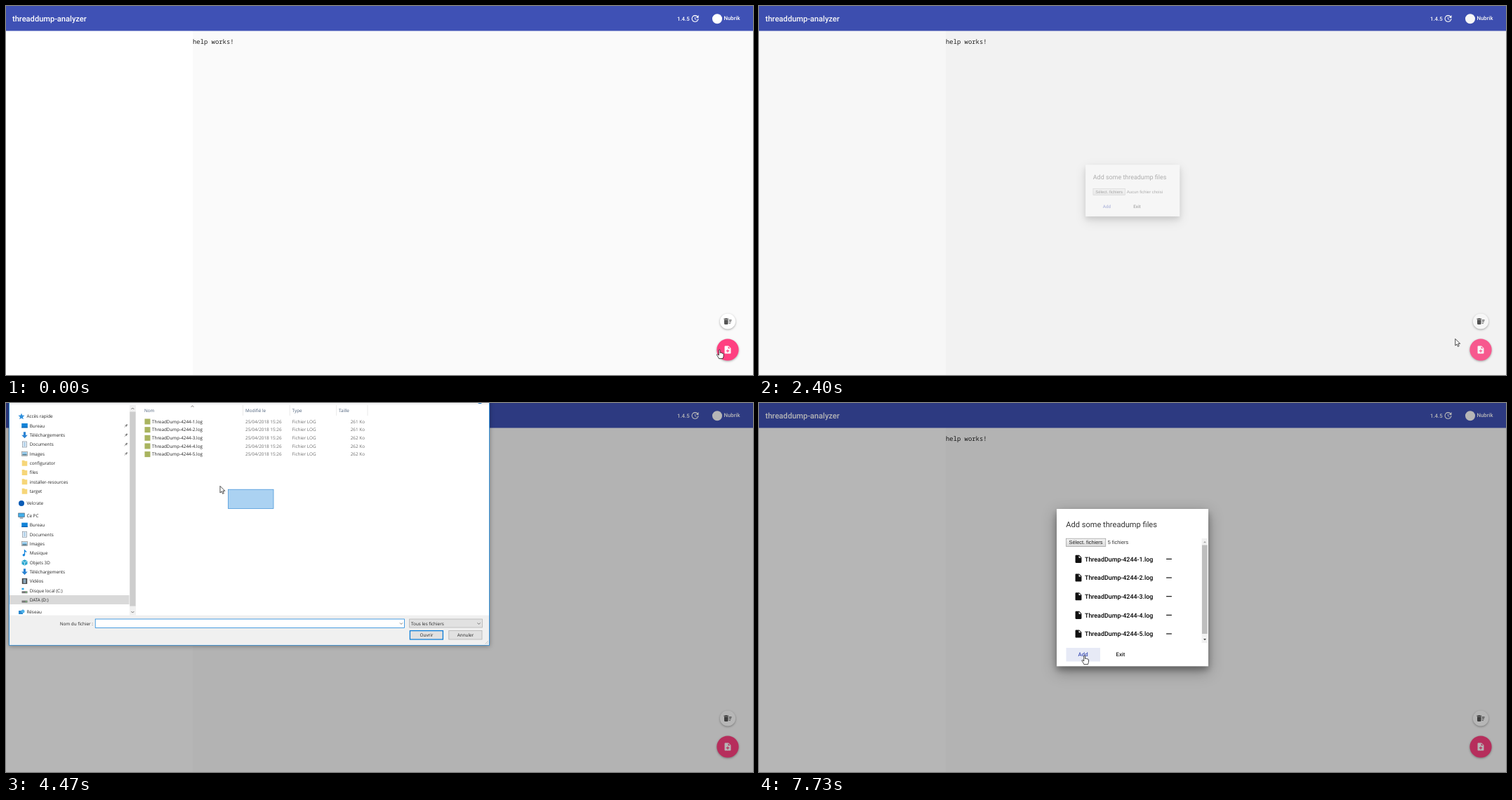
Animation, 1064 px wide and 526 px high, one loop 8000 ms. Source, as an HTML page:

```html
<!DOCTYPE html>
<html lang="fr">
<head>
<meta charset="utf-8">
<title>threaddump-analyzer</title>
<style>
html, body { margin: 0; width: 100%; height: 100%; overflow: hidden; background: #fafafa; }
svg { display: block; width: 100vw; height: 100vh; }
text { white-space: pre; text-rendering: geometricPrecision; }
.ui { font: 7.78px Roboto, sans-serif; }
.med { font-weight: 500; }
.head { font-size: 11.1px; }
.file { font-size: 8.89px; }
.mono { font: 8.89px "Noto Sans Mono", monospace; }
.btn { font: 7.4px "Liberation Sans", Arial, sans-serif; }
.win { font: 6.35px "Open Sans", sans-serif; }
.mid { text-anchor: middle; }
.end { text-anchor: end; }
.fab { filter: drop-shadow(0 1.5px 1.5px #0005); }
.card { filter: drop-shadow(0 5px 4px #0004) drop-shadow(0 6px 10px #0005); }
.window { filter: drop-shadow(0 1px 3px #0005); }
</style>
</head>
<body>
<svg id="stage" viewBox="0 0 1064 526" preserveAspectRatio="none"></svg>
<script>
const text = (x, y, s, cls, fill = '#222') =>
  `<text x="${x}" y="${y}" class="${cls}" fill="${fill}">${s}</text>`;
// Box given by its edges
const box = (l, t, r, b, fill, more = '') =>
  `<rect x="${l}" y="${t}" width="${r - l}" height="${b - t}" fill="${fill}" ${more}/>`;
const path = (d, fill, more = '') => `<path d="${d}" fill="${fill}" ${more}/>`;
const line = (d, color, w = 0.8) => path(d, 'none', `stroke="${color}" stroke-width="${w}"`);
const dot = (x, y, r, fill, more = '') => `<circle cx="${x}" cy="${y}" r="${r}" fill="${fill}" ${more}/>`;
const at = (x, y, s) => `<g transform="translate(${x} ${y})">${s}</g>`;
const edge = (color, w = 0.7) => `stroke="${color}" stroke-width="${w}"`;
const group = (id, s) => `<g id="${id}">${s}</g>`;

const glyphs = {
  update: 'M21 10.12h-6.78l2.74-2.82c-2.73-2.7-7.15-2.8-9.88-.1-2.73 2.71-2.73 7.08 0 9.79s7.15 2.71 9.88 0C18.32 15.65 19 14.08 19 12.1h2c0 1.98-.88 4.55-2.64 6.29-3.51 3.48-9.21 3.48-12.72 0-3.5-3.47-3.53-9.11-.02-12.58s9.14-3.47 12.65 0L21 3v7.12zM12.5 8v4.25l3.5 2.08-.72 1.21L11 13V8h1.5z',
  sweep: 'M15 16h4v2h-4zm0-8h7v2h-7zm0 4h6v2h-6zM3 18c0 1.1.9 2 2 2h6c1.1 0 2-.9 2-2V8H3v10zM14 5h-3l-1-1H6L5 5H2v2h12z',
  add: 'M14 2H6c-1.1 0-2 .9-2 2v16c0 1.1.9 2 2 2H18c1.1 0 2-.9 2-2V8l-6-6zm2 14h-3v3h-2v-3H8v-2h3v-3h2v3h3v2zm-3-7V3.5L18.5 9H13z',
  file: 'M6 2c-1.1 0-2 .9-2 2v16c0 1.1.9 2 2 2H18c1.1 0 2-.9 2-2V8l-6-6H6zm7 7V3.5L18.5 9H13z',
  minus: 'M19 13H5v-2h14v2z'
};
const glyph = (name, x, y, fill) =>
  path(glyphs[name], fill, `transform="translate(${x} ${y}) scale(.556) translate(-12 -12)"`);

const names = [1, 2, 3, 4, 5].map(n => `ThreadDump-4244-${n}.log`);

const page =
  box(0, 0, 1064, 526, '#fafafa') + box(0, 35, 266, 526, '#fff') + box(0, 0, 1064, 35.5, '#3f51b5') +
  text(9, 21.6, 'threaddump-analyzer', 'ui med head', '#fff') +
  text(956, 20.6, '1.4.5', 'ui med', '#fff') + glyph('update', 981.5, 18, '#fff') +
  dot(1013, 18.2, 7, '#fff') + text(1022.5, 20.3, 'Nubrik', 'ui med', '#fff') +
  text(266, 53.6, 'help works!', 'mono') +
  dot(1028, 449.5, 11.1, '#fff', 'class="fab"') + glyph('sweep', 1028, 449.5, '#555') +
  dot(1028, 490, 15.6, '#ff4081', 'class="fab"') +
  '<clipPath id="round"><circle cx="1028" cy="490" r="15.6"/></clipPath>' +
  `<g clip-path="url(#round)">${dot(1022, 490, 0, '#fff', 'id="ripple"')}</g>` +
  glyph('add', 1028, 490, '#fff');

// Shared dialog parts, placed from the card's top left corner
const form = (x, y, w, h, status, rest) => at(x, y,
  box(0, 0, w, h, '#fff', 'class="card"') +
  text(13.2, 26, 'Add some threadump files', 'ui head', '#333') +
  box(13.4, 42.2, 69.8, 53.4, 'url(#grey)', `class="choose" ${edge('#999')}`) +
  text(41.5, 50.4, 'Sélect. fichiers', 'btn mid') + text(72.7, 50.4, status, 'btn', '#333') +
  rest +
  text(37.6, h - 14.3, 'Add', 'ui med mid', '#3f51b5') + text(91, h - 14.3, 'Exit', 'ui med mid'));

const emptyForm = form(449, 217.5, 166.5, 91.3, 'Aucun fichier choisi', '');
const fullForm = form(424, 151, 216, 224.3, '5 fichiers',
  box(136, 168.5, 184, 187.5, '#0000001f', 'id="minusHover"') +
  box(13.5, 198, 62, 217.5, '#3f51b51f', 'id="addHover"') +
  names.map((n, i) => {
    const y = 71.4 + i * 26.65;
    return glyph('file', 31, y, '#111') + text(40, y + 3.2, n, 'ui med file', '#000') +
      glyph('minus', 160, y, '#000');
  }).join('') +
  box(206.5, 42, 215.3, 191, '#f1f1f1') + box(207, 51.5, 214.6, 178, '#bebebe') +
  path('M209 48.2l2-2.2 2 2.2z', '#a3a3a3') + path('M209 185l2 2.2 2-2.2z', '#444'));

const blue = '#1979ca', drive = box(-4, 1, 4, 4, '#777') + box(1.5, 2, 3, 3, '#7f7');
const page9 = box(-3, -4, 3, 4, '#fff', edge('#789'));
const icons = {
  star: path('M0-4.5L1.2-1.4 4.5-1.2 2 1 2.8 4.2 0 2.4-2.8 4.2-2 1-4.5-1.2-1.2-1.4z', '#2d8fdd'),
  desk: box(-4.3, -3.3, 4.3, 3, '#1283d8') + box(-4.3, 2, 4.3, 3, '#0b5ca8'),
  down: path('M-1.6-4.3H1.6V0H4.3L0 4.5-4.3 0H-1.6z', '#2b83d3'),
  doc: page9 + line('M-1.7-2H1.7M-1.7 0H1.7M-1.7 2H1.7', '#4b95cf'),
  image: box(-4, -3, 4, 3, '#fff', edge('#888')) + box(-3.2, -2.2, 3.2, .5, '#8fc9ee') + box(-3.2, .5, 3.2, 2.2, '#47748b'),
  folder: path('M-3.8-4H-.5L.5-3H3.8V4H-3.8z', '#f6d679'),
  plain: dot(0, 0, 4, '#0a5bb5'),
  pc: box(-4.3, -3.6, 4.3, 2, '#43aee9', edge('#567')) + box(-2.4, 3, 2.4, 4, '#567'),
  note: dot(-1.2, 2.8, 1.7, '#1586dd') + line('M0 2.8V-4L2.6-1.5', '#1586dd', 1.3),
  cube: path('M0-4L4-2V2.4L0 4.4-4 2.4V-2z', '#2ea7cf') + line('M-4-2L0 0 4-2M0 0V4', '#d5f3fb'),
  film: box(-3.7, -4, 3.7, 4, '#444') + box(-2, -3, 2, 3, '#8aa7bb'),
  disk: box(-4, -3.5, -1, -1, '#28a8ea') + drive,
  drive,
  net: box(-4, -2, 2, 3, '#2c8ad0') + dot(2, -1, 2.5, '#4fb0e8')
};

const places = [
  [19, 'star Accès rapide', 'desk Bureau', 'down Téléchargements', 'doc Documents', 'image Images',
    'folder configurator', 'folder files', 'folder installer-resources', 'folder target'],
  [143, 'plain Velcrate'],
  [160.6, 'pc Ce PC', 'desk Bureau', 'doc Documents', 'image Images', 'note Musique', 'cube Objets 3D',
    'down Téléchargements', 'film Vidéos', 'disk Disque local (C:)', 'drive DATA (D:)'],
  [298, 'net Réseau']
];
const sidebar = places.map(([top, ...items], g) => items.map((item, i) => {
  const y = top + i * 13.33, cut = item.indexOf(' ');
  const pin = g == 0 && i > 0 && i < 5
    ? at(171, y, line('M-2.3 2.3L0 0M-1.5-1L1 1.5', '#777', .7) + path('M-.8-.4L1-2.4 2.4-1 .4.8z', '#777')) : '';
  return at(i ? 26.5 : 22, y, icons[item.slice(0, cut)]) +
    text(i ? 33.7 : 29.4, y + 2.3, item.slice(cut + 1), 'win') + pin;
}).join('')).join('');

const rowY = i => 26.5 + i * 11.65;
const rows = names.map((n, i) => {
  const y = rowY(i), b = y + 2.3;
  return box(195.3, y - 5.6, 512.7, y + 5.6, '#cce8ff', `class="row" ${edge('#99d1ff', .6)}`) +
    box(197.5, y - 4, 205.5, y + 4, '#a9b45f') + text(208, b, n, 'win') +
    text(341, b, '25/04/2018 15:26', 'win', '#6d6d6d') + text(407.6, b, 'Fichier LOG', 'win', '#6d6d6d') +
    text(511, b, (i < 2 ? 261 : 262) + ' Ko', 'win end', '#6d6d6d');
}).join('');

const caret = (x, y, s = 1) => line(`M${x - 2} ${y - s}L${x} ${y + s} ${x + 2} ${y - s}`, '#444', .7);
const picker =
  box(4.4, -20, 688.6, 345.2, '#fff', `class="window" ${edge('#1883d7', .9)}`) +
  box(5, -12, 688, 2.8, '#f5f6f7') +
  text(13.7, -3.2, 'Organiser ▾', 'win') + text(68, -3.2, 'Nouveau dossier', 'win') + dot(675, -3, 4, '#0b63b8') +
  box(5, 302.6, 688, 344.8, '#f0f0f0') + box(5, 274, 175.5, 287, '#d9d9d9') +
  sidebar +
  box(176, 3, 185, 302.6, '#f0f0f0') + box(176.3, 12.5, 184.6, 289.5, '#cdcdcd') +
  caret(180.4, 8, -1) + caret(180.4, 298) +
  ['197 Nom', '341 Modifié le', '407.6 Type', '474 Taille'].map(h =>
    text(parseFloat(h), 12.8, h.slice(h.indexOf(' ') + 1), 'win', '#4c607a')).join('') +
  line('M337.5 3V18M404.2 3V18M470.6 3V18M515 3V18', '#e5e5e5') + caret(265.5, 4.8, -.8) + rows +
  text(124, 316.6, 'Nom du fichier :', 'win end') +
  box(127.2, 308, 567.6, 320.4, '#fff', `id="field" ${edge('#0078d7')}`) +
  box(128.5, 309.3, 525, 319.2, '#0078d7', 'id="mark"') +
  text(129, 316.6, '', 'win" id="chosen') + caret(563, 314.4) +
  box(574.7, 308, 678.4, 320, '#e1e1e1', edge('#adadad')) + text(577, 316.6, 'Tous les fichiers', 'win') + caret(673.5, 314.4) +
  box(575.4, 324.6, 622.4, 337, '#e1e1e1', `id="open" ${edge('#0078d7', 1.2)}`) + text(599, 333.2, 'Ouvrir', 'win mid') +
  box(630.8, 324.6, 678, 337, '#e1e1e1', edge('#adadad')) + text(654.5, 333.2, 'Annuler', 'win mid') +
  line('M682.5 343.5L687 339M685 343.5L687 341.5', '#bbb') +
  `<rect id="lasso" fill="#0078d7" fill-opacity=".33" ${edge('#3c8fd6')}/>`;

const outline = edge('#000') + ' stroke-linejoin="round"';
const cursor =
  path('M0 0V9.6L2.2 7.6 3.7 11 5.4 10.2 3.9 6.9H6.9z', '#fff', 'id="arrow" ' + outline) +
  path('M-1 .8C-1-.3 .9-.3 .9 .8V4.6C1.2 3.8 2.6 4 2.7 4.9 3 4.2 4.2 4.4 4.3 5.4 4.8 4.9 5.8 5.2 5.8 6.2V9.2L4.8 12.6H-.8L-2 10.2-3.8 7.4C-3.9 6.2-2.4 6.2-1.9 7L-1 8z',
    '#fff', 'id="hand" ' + outline);

const $ = id => document.getElementById(id);
$('stage').innerHTML =
  '<linearGradient id="grey" x2="0" y2="1"><stop stop-color="#f4f4f4"/><stop offset="1" stop-color="#dadada"/></linearGradient>' +
  page + box(0, 0, 1064, 526, '#000', 'id="shade"') +
  group('empty', emptyForm) + group('full', fullForm) + group('picker', picker) + group('cursor', cursor);

const set = (el, attrs) => { for (const k in attrs) el.setAttribute(k, attrs[k]); };
const show = (id, on) => $(id).style.display = on ? '' : 'none';
const ramp = (t, from, to) => Math.min(1, Math.max(0, (t - from) / (to - from)));
const smooth = p => p * p * (3 - 2 * p);
const zoom = (x, y, s) => `translate(${x} ${y}) scale(${s}) translate(${-x} ${-y})`;
const within = ([x, y], l, t, r, b) => x > l && x < r && y > t && y < b;

// time, x, y of the pointer
const stops = [
  [0, 1016.3, 490], [800, 701, 333], [870, 701, 333], [1730, 1015, 485], [1930, 1022, 490], [2270, 1022, 490],
  [3070, 594, 269.5], [3130, 483, 269.5], [3640, 483, 269.5], [4130, 381, 150.5], [4200, 381, 150.5],
  [4470, 304, 118], [4730, 192, 12], [4800, 192, 12], [5270, 680, 368], [5670, 601, 327], [5730, 601, 327],
  [6130, 609, 331], [6200, 609, 331], [6270, 598.5, 331.5], [7130, 598.5, 331.5], [7730, 463.7, 360], [8000, 463.7, 360]
];
function pointer(t) {
  const i = Math.max(1, stops.findIndex(s => s[0] >= t));
  const [t0, x0, y0] = stops[i - 1], [t1, x1, y1] = stops[i];
  let p = ramp(t, t0, t1);
  if (t < 4200 || t > 4730) p = smooth(p);
  return [x0 + (x1 - x0) * p, y0 + (y1 - y0) * p];
}

function draw(t) {
  const pos = pointer(t);
  const onFab = Math.hypot(pos[0] - 1028, pos[1] - 490) < 16;
  const onAdd = t > 7000 && within(pos, 437, 349, 486, 369);
  const onMinus = t > 6520 && within(pos, 560, 319, 608, 339);
  const hand = t < 2260 ? onFab : onMinus || onAdd;
  set($('cursor'), { transform: `translate(${pos})` });
  show('hand', hand);
  show('arrow', !hand);

  set($('ripple'), {
    r: t < 2260 ? 0 : 14 + 14 * ramp(t, 2260, 2500),
    opacity: 0.16 * (1 - ramp(t, 2350, 2750))
  });
  set($('shade'), { opacity: 0.288 * smooth(ramp(t, 2320, 2720)) });

  const grow = smooth(ramp(t, 2320, 2520));
  show('empty', grow > 0 && t < 6520);
  set($('empty'), { opacity: grow, transform: zoom(532, 263, 0.7 + 0.3 * grow) });
  set(document.querySelector('.choose'), { stroke: t > 3320 ? '#666' : '#999' });
  show('full', t > 6520);
  show('minusHover', onMinus);
  show('addHover', onAdd);

  const alpha = smooth(ramp(t, 3620, 3870)) * (1 - ramp(t, 6530, 6730));
  show('picker', alpha > 0);
  set($('picker'), { opacity: alpha, transform: zoom(346, 142.5, 0.96 + 0.04 * alpha) });

  // The selection box trails the pointer slightly
  const dragging = t > 4260 && t < 4790;
  const [x, y] = pointer(t - 40), top = Math.max(18, y);
  show('lasso', dragging);
  set($('lasso'), { x, y: top, width: Math.max(0, 381 - x), height: Math.max(0, 150.5 - top) });
  const picked = names.map((n, i) => t > 4790 || dragging && top < rowY(i) + 5.6);
  const leaving = t > 6460;
  document.querySelectorAll('.row').forEach((row, i) => {
    row.style.display = picked[i] ? '' : 'none';
    set(row, {
      fill: leaving ? (i ? '#d9d9d9' : '#b8bcc0') : '#cce8ff',
      stroke: leaving ? (i ? '#d0d0d0' : '#777') : '#99d1ff'
    });
  });
  $('chosen').textContent = names.filter((n, i) => picked[i]).map(n => `"${n}"`).join(' ');
  set($('chosen'), { fill: leaving ? '#fff' : '#222' });
  show('mark', leaving);
  set($('field'), { stroke: picked[4] && !leaving ? '#7a7a7a' : '#0078d7' });
  const onOpen = t > 5500 && within(pos, 575, 324, 623, 337);
  set($('open'), { fill: leaving ? '#cce4f7' : onOpen ? '#e5f1fb' : '#e1e1e1' });
}

function tick() {
  const ms = performance.now() % 8000;
  draw(Math.floor((ms + 5) * 0.015) / 0.015);
  requestAnimationFrame(tick);
}
tick();
</script>
</body>
</html>
```
